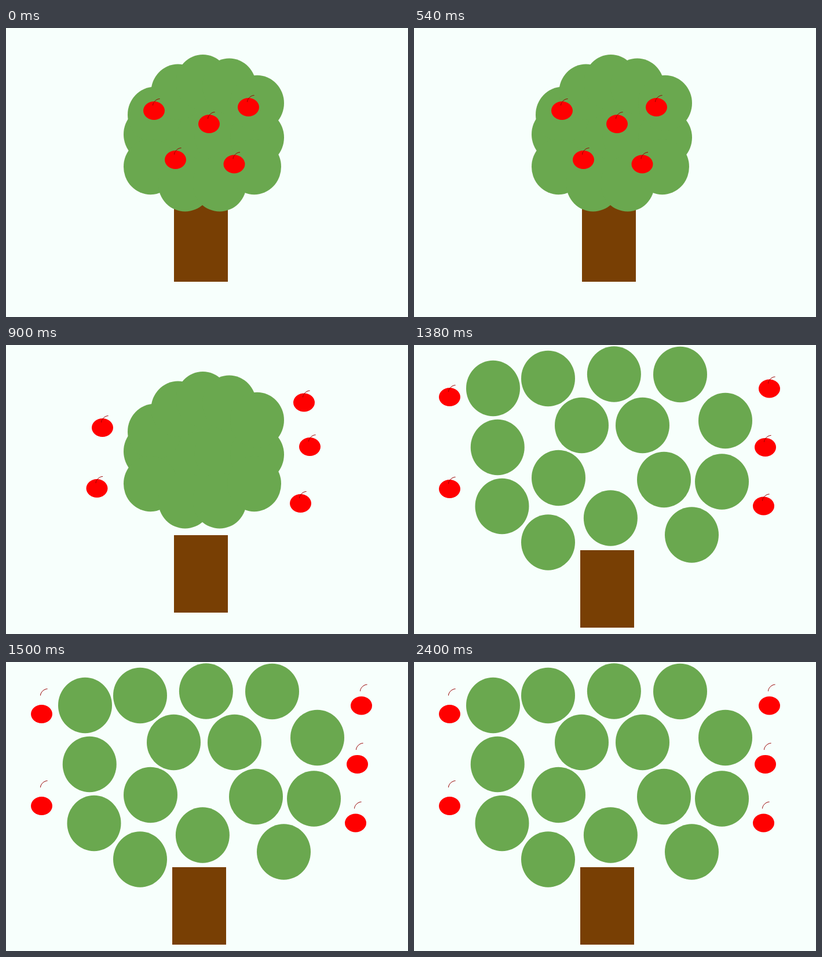
An HTML page for the animation above (3000 ms loop, 694x500 px).

```html
<!DOCTYPE html>
<html lang="en">
<head>
<meta charset="utf-8">
<title>Apple tree in parts</title>
<style>
  html, body { margin: 0; width: 100%; height: 100%; overflow: hidden; background: #f7fffc; }
  svg { display: block; width: 694px; height: 500px; }
</style>
</head>
<body>
<svg id="stage" viewBox="0 0 694 500"></svg>
<script>
const LOOP = 3000;
const stage = document.getElementById('stage');

// Evenly spaced points from one end to the other along a bulging line.
function arc(count, [x1, y1], [x2, y2] = [x1, y1], bulge = 0) {
  const dx = x2 - x1, dy = y2 - y1, length = Math.hypot(dx, dy) || 1;
  return Array.from({ length: count }, (_, i) => {
    const t = count > 1 ? i / (count - 1) : 0;
    const out = 4 * t * (1 - t) * bulge / length;
    return [x1 + dx * t + dy * out, y1 + dy * t - dx * out];
  });
}

const crown = [
  ...arc(2, [341, 140], [341, 230]),
  ...arc(4, [249.5, 184], [433.5, 189.5]),
  ...arc(5, [256.5, 150], [433.5, 130], 46),
  ...arc(4, [249.5, 240], [428.5, 240], -33)
];

const spread = [
  ...arc(3, [136.5, 75], [152, 279]),
  ...arc(3, [231.5, 58], [459.5, 51], 4),
  ...arc(3, [537.5, 131], [479.5, 328.5], 24),
  ...arc(2, [289.5, 139], [394.5, 139]),
  ...arc(3, [249.5, 230], [431.5, 233], -68),
  ...arc(1, [231.5, 341.5])
];

const hanging = [
  ...arc(2, [255.5, 143], [418.5, 137]),
  ...arc(1, [350.5, 166]),
  ...arc(2, [292.5, 228], [394, 235.5])
];

const picked = [
  ...arc(2, [166.5, 143], [157, 248]),
  ...arc(2, [514.5, 99.5], [524.5, 176]),
  ...arc(1, [508.5, 274])
];

const aside = [
  ...arc(2, [61.5, 90], [61.5, 249]),
  ...arc(3, [613.5, 75.5], [603.5, 278.5], -2)
];

const POSES = [
  { at: 0, trunk: [290, 305], leaves: crown, apples: hanging },
  { at: 900, trunk: [290, 329], leaves: crown, apples: picked },
  { at: 1200, trunk: [287, 355], leaves: spread, apples: aside },
  { at: 1500, trunk: [287, 355], leaves: spread, apples: aside, stemsOff: true }
];

function add(tag, attrs, parent = stage) {
  const el = document.createElementNS('http://www.w3.org/2000/svg', tag);
  for (const key in attrs) el.setAttribute(key, attrs[key]);
  return parent.appendChild(el);
}

function move(el, [x, y]) {
  el.setAttribute('transform', `translate(${x} ${y})`);
}

const trunk = add('rect', { width: 93, height: 134, fill: '#783f04' });
const leaves = crown.map(() => add('ellipse', { rx: 46.5, ry: 48.2, fill: '#6aa84f' }));
const apples = hanging.map(() => {
  const group = add('g', {});
  add('ellipse', { rx: 18.5, ry: 16, fill: '#f00' }, group);
  const stem = add('path', {
    d: 'M-2 -9C-2 -14.5 4 -20.5 10 -20.5',
    fill: 'none', stroke: '#980000'
  }, group);
  return { group, stem };
});

function show(pose) {
  move(trunk, pose.trunk);
  leaves.forEach((leaf, i) => move(leaf, pose.leaves[i]));
  apples.forEach(({ group, stem }, i) => {
    const spot = pose.apples[i];
    const lift = spot[0] < 347 ? 23 : 16;
    move(group, spot);
    move(stem, [0, pose.stemsOff ? -lift : 0]);
  });
}

const start = performance.now();
let shown;

function tick() {
  const t = (performance.now() - start) % LOOP;
  const pose = POSES.findLast(p => p.at <= t);
  if (pose !== shown) show(shown = pose);
  requestAnimationFrame(tick);
}

tick();
</script>
</body>
</html>
```
